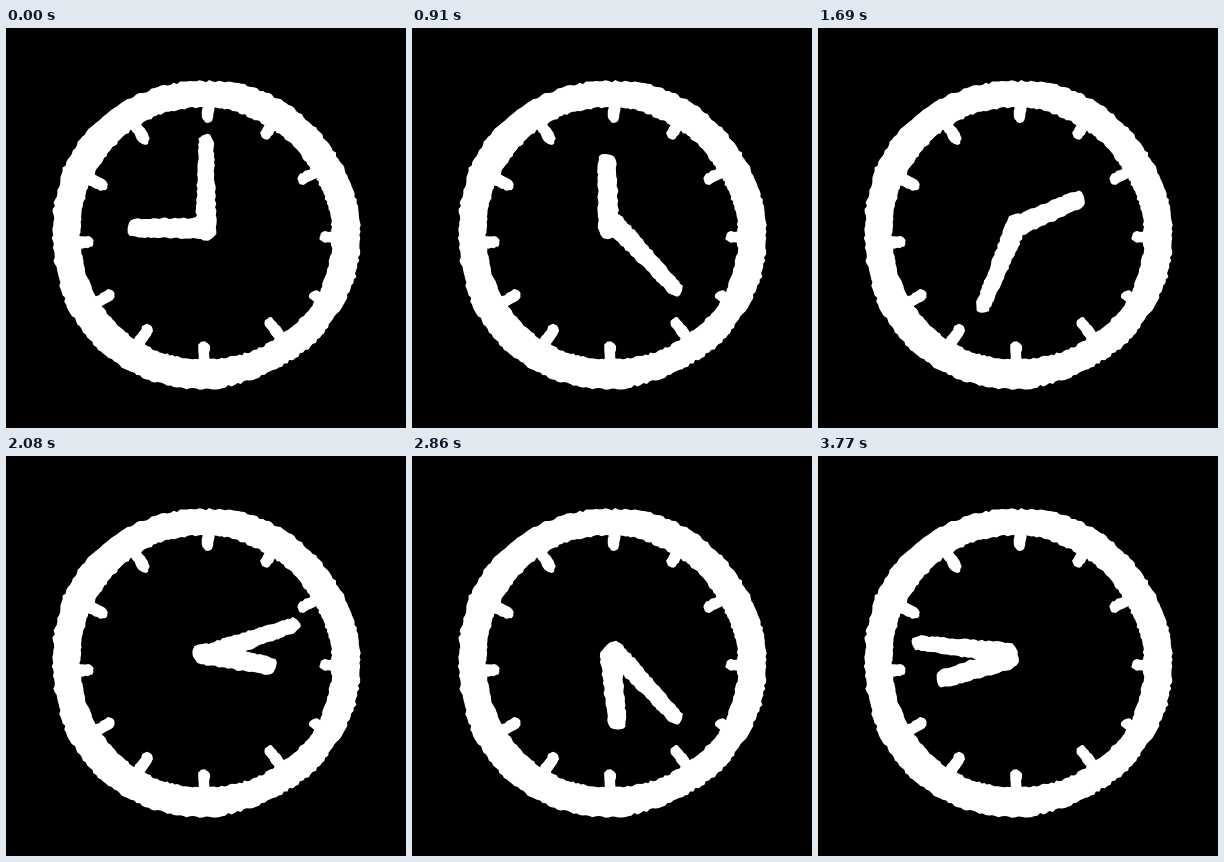
These frames come from a looping animation (400x400 px, 3.9 s). An HTML page:

```html
<!DOCTYPE html>
<html lang="en">
<head>
<meta charset="utf-8">
<title>Clock</title>
<style>
html, body { margin: 0; width: 100%; height: 100%; overflow: hidden; background: #000; }
svg { display: block; width: 100vw; height: 100vh; }
</style>
</head>
<body>
<svg viewBox="0 0 400 400" fill="#fff">
  <path id="ring" fill-rule="evenodd"/>
  <g id="ticks"></g>
  <path id="hour"/>
  <path id="minute"/>
</svg>
<script>
const STEP = 130, STEPS = 30, CX = 200, CY = 207;
const $ = id => document.getElementById(id);
const rad = deg => deg * Math.PI / 180;

let seed = 7;
const random = () => (seed = seed * 16807 % 2147483647) / 2147483647;
const jitter = amount => (random() * 2 - 1) * amount;
const toPath = points => 'M' + points.map(p => p.map(v => v.toFixed(1)).join(' ')).join('L') + 'Z';

// Closed, chalky outline through radii spaced evenly clockwise from the top.
function roughLoop(radii, rough) {
  const count = 300, n = radii.length, points = [];
  for (let i = 0; i < count; i++) {
    const pos = i / count * n, k = Math.floor(pos), u = pos - k;
    const ease = (1 - Math.cos(u * Math.PI)) / 2;
    const r = radii[k] + (radii[(k + 1) % n] - radii[k]) * ease + jitter(rough);
    const a = i / count * 2 * Math.PI;
    points.push([CX + r * Math.sin(a), CY - r * Math.cos(a)]);
  }
  return toPath(points);
}

// Tapered rounded stroke from the origin upwards.
function roughStroke(length, baseR, tipR, rough) {
  const points = [], sides = Math.max(3, Math.round(length / 3));
  const add = (x, y) => points.push([x + jitter(rough), y + jitter(rough)]);
  const cap = (y, r, from) => {
    for (let a = from; a <= from + 180; a += 20) add(r * Math.cos(rad(a)), y + r * Math.sin(rad(a)));
  };
  const side = (sign, up) => {
    for (let i = 1; i < sides; i++) {
      const u = up ? i / sides : 1 - i / sides;
      add(sign * (baseR + (tipR - baseR) * u), -length * u);
    }
  };
  cap(0, baseR, 0);
  side(-1, true);
  cap(-length, tipR, 180);
  side(1, false);
  return toPath(points);
}

const place = (el, angle, x, y) => el.setAttribute('transform', `translate(${x} ${y}) rotate(${angle})`);

const outer = [154, 155, 154, 153, 153, 154, 154, 155, 153, 153, 151, 152,
  154, 155, 156, 157, 156, 154, 153, 155, 158, 157, 156, 155];
const inner = [128, 125, 124, 126, 127, 125, 124, 126, 126, 126, 127, 129];
$('ring').setAttribute('d', roughLoop(outer, 1.2) + roughLoop(inner, 1));

const tickTips = [[202, 89], [260, 106], [297, 151], [319, 209], [309, 268], [264, 295],
  [198, 319], [141, 302], [103, 267], [82, 214], [96, 157], [138, 111]];
for (const [x, y] of tickTips) {
  const dx = CX - x, dy = CY - y, tick = document.createElementNS('http://www.w3.org/2000/svg', 'path');
  tick.setAttribute('d', roughStroke(138 - Math.hypot(dx, dy), 5.6, 6, 0.7));
  place(tick, Math.atan2(-dx, dy) * 180 / Math.PI, x, y);
  $('ticks').append(tick);
}

$('hour').setAttribute('d', roughStroke(66, 10.5, 9, 0.9));
$('minute').setAttribute('d', roughStroke(88.5, 10.3, 7.5, 0.9));

// Hour hand: step, angle, pivot x, pivot y
const hourKeys = [[0, 270, 196, 200], [4, 327, 193, 198], [9, 379, 199.5, 202], [13, 426, 198, 199],
  [19, 494, 195.5, 197], [25, 574, 201, 202], [29, 613, 190, 203]];
// Minute hand: angle, pivot x, pivot y; the first pose only opens the loop
const minutePoses = [[0, 200, 202], [71, 203, 198], [137, 203, 196],
  [202.5, 199, 196], [276.5, 189, 197], [355, 199, 197]];

function hourPose(step) {
  const i = Math.max(1, hourKeys.findIndex(key => key[0] >= step));
  const a = hourKeys[i - 1], b = hourKeys[i], u = (step - a[0]) / (b[0] - a[0]);
  return [1, 2, 3].map(k => a[k] + (b[k] - a[k]) * u);
}

function draw(time) {
  const step = Math.floor(time / STEP) % STEPS;
  place($('hour'), ...hourPose(step));
  place($('minute'), ...minutePoses[step ? (step - 1) % 5 + 1 : 0]);
}

const start = performance.now();
function tick() {
  draw(performance.now() - start);
  requestAnimationFrame(tick);
}
tick();
</script>
</body>
</html>
```
